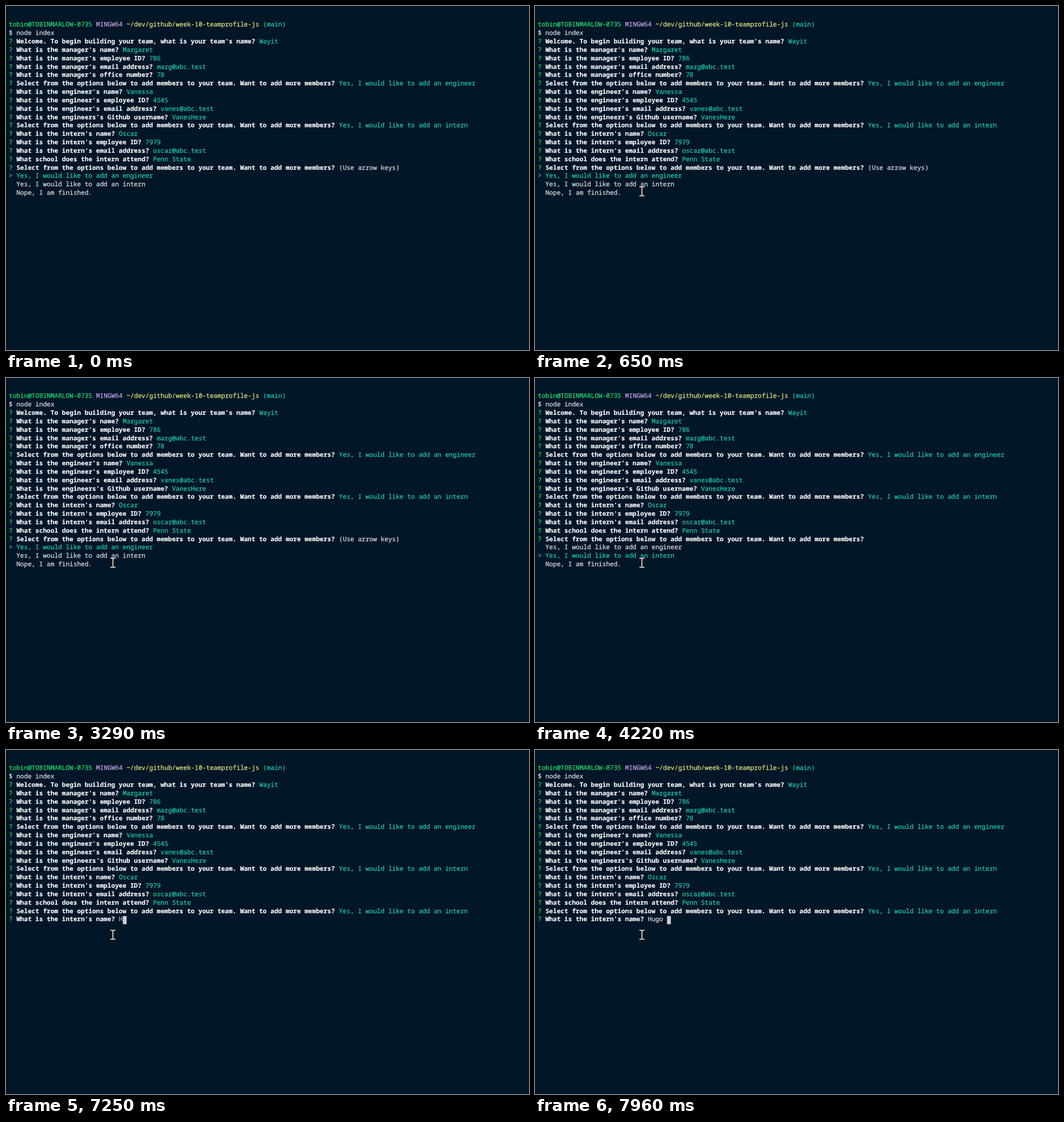
Write an HTML page that moves like this. It is 922 by 607 pixels and loops after 8 s.

```html
<!DOCTYPE html>
<html lang="en">
<head>
<meta charset="utf-8">
<title>Team profile prompt</title>
<style>
  html, body { margin: 0; width: 100%; height: 100%; overflow: hidden; background: #011627; }
  svg { display: block; width: 922px; height: 607px; }
  text {
    font: 11.15px "Noto Sans Mono", "DejaVu Sans Mono", monospace;
    white-space: pre;
    text-rendering: geometricPrecision;
    fill: var(--ink);
    stroke: var(--ink);
    stroke-width: 0.28;
  }
  .fg { --ink: #dcd9d8; }
  .ask { --ink: #fff; font-weight: 700; stroke-width: 0.12; }
  .green { --ink: #22da6e; }
  .cyan { --ink: #21c7a8; }
  .path { --ink: #e0e27a; }
  .sys { --ink: #c79fe6; }
  .dim { --ink: #a5abb2; }
  .block { fill: #cfcfcf; }
  #mouse path { fill: none; stroke: #fff0df; stroke-width: 1.6; }
  #mouse path:first-child { stroke: #000d18; stroke-width: 3; }
</style>
</head>
<body>
<svg viewBox="0 0 922 607">
  <g id="screen">
    <g id="log"></g>
    <g id="live"></g>
    <g id="mouse">
      <path d="M-4.5-8H-1.5L0-7 1.5-8H4.5M0-7V7M-4.5 8H-1.5L0 7 1.5 8H4.5"/>
      <path d="M-4.5-8H-1.5L0-7 1.5-8H4.5M0-7V7M-4.5 8H-1.5L0 7 1.5 8H4.5"/>
    </g>
  </g>
</svg>
<script>
const LOOP = 8000, LEFT = 5, COL = 6.69, BASE = 36.3, ROW = 14.84;
const NS = "http://www.w3.org/2000/svg";
const [screenEl, log, live, mouse] =
  ["screen", "log", "live", "mouse"].map(id => document.getElementById(id));

function add(parent, tag, attrs, content = "") {
  const el = document.createElementNS(NS, tag);
  for (const key in attrs) el.setAttribute(key, attrs[key]);
  el.textContent = content;
  parent.append(el);
}

// Writes [class, text] parts along one terminal row and returns the next column.
function line(parent, row, ...parts) {
  const y = Math.round(BASE + row * ROW);
  let col = 0;
  for (const [cls, str] of parts) {
    add(parent, "text", { class: cls, x: LEFT + col * COL, y }, str);
    col += str.length;
  }
  return col;
}

const ask = (parent, row, question, answer = "", cls = "cyan") =>
  line(parent, row, ["green", "? "], ["ask", question + " "], [cls, answer]);

const MORE = "Select from the options below to add members to your team. Want to add more members?";
const OPTIONS = [
  "Yes, I would like to add an engineer",
  "Yes, I would like to add an intern",
  "Nope, I am finished."
];

line(log, 0, ["green", "tobin@TOBINMARLOW-0735 "], ["sys", "MINGW64 "],
  ["path", "~/dev/github/week-10-teamprofile-js "], ["cyan", "(main)"]);
line(log, 1, ["fg", "$ node index"]);
[
  ["Welcome. To begin building your team, what is your team's name?", "Wayit"],
  ["What is the manager's name?", "Margaret"],
  ["What is the manager's employee ID?", "786"],
  ["What is the manager's email address?", "marg@abc.test"],
  ["What is the manager's office number?", "78"],
  [MORE, OPTIONS[0]],
  ["What is the engineer's name?", "Vanessa"],
  ["What is the engineer's employee ID?", "4545"],
  ["What is the engineer's email address?", "vanes@abc.test"],
  ["What is the engineers's Github username?", "VanesHere"],
  [MORE, OPTIONS[1]],
  ["What is the intern's name?", "Oscar"],
  ["What is the intern's employee ID?", "7979"],
  ["What is the intern's email address?", "oscar@abc.test"],
  ["What school does the intern attend?", "Penn State"]
].forEach(([question, answer], i) => ask(log, i + 2, question, answer));

function menu(selected, hint) {
  ask(live, 17, MORE, hint, "fg");
  OPTIONS.forEach((option, i) => {
    const on = i === selected;
    line(live, 18 + i, [on ? "cyan" : "fg", (on ? "> " : "  ") + option]);
  });
}

function typing(typed, cls = "fg") {
  ask(live, 17, MORE, OPTIONS[1]);
  const col = ask(live, 18, "What is the intern's name?", typed, cls);
  add(live, "rect", { class: "block", x: LEFT + col * COL + 0.3, y: 294, width: COL, height: 14.4 });
}

const STEPS = [
  [0, () => menu(0, "(Use arrow keys)")],
  [4220, () => menu(1, "")],
  [5850, () => typing("")],
  [7250, () => typing("H", "dim")],
  [7330, () => typing("H")],
  [7420, () => typing("Hu")],
  [7560, () => typing("Hug")],
  [7650, () => typing("Hugo")],
  [7960, () => typing("Hugo ")]
];

// The pointer glides in from the lower right, sampled every 80 ms.
const ENTER = 170, TICK = 80, MOVES = 6, FROM = [484, 414], TO = [188.5, 327];

function placeMouse(t) {
  mouse.style.display = t < ENTER ? "none" : "";
  const k = Math.max(0, Math.min(MOVES, Math.floor((t - ENTER) / TICK))) / MOVES;
  const p = 1 - (1 - k) ** 2;
  const [x, y] = FROM.map((v, i) => v + (TO[i] - v) * p);
  mouse.setAttribute("transform", `translate(${x} ${y})`);
}

let shown = -1;
function draw() {
  const t = performance.now() % LOOP;
  const now = STEPS.findLastIndex(([start]) => start <= t);
  if (now !== shown) {
    live.replaceChildren();
    STEPS[now][1]();
    shown = now;
  }
  screenEl.setAttribute("transform", `translate(0 ${t < 1780 ? 0 : -1})`);
  placeMouse(t);
  requestAnimationFrame(draw);
}
draw();
</script>
</body>
</html>
```
